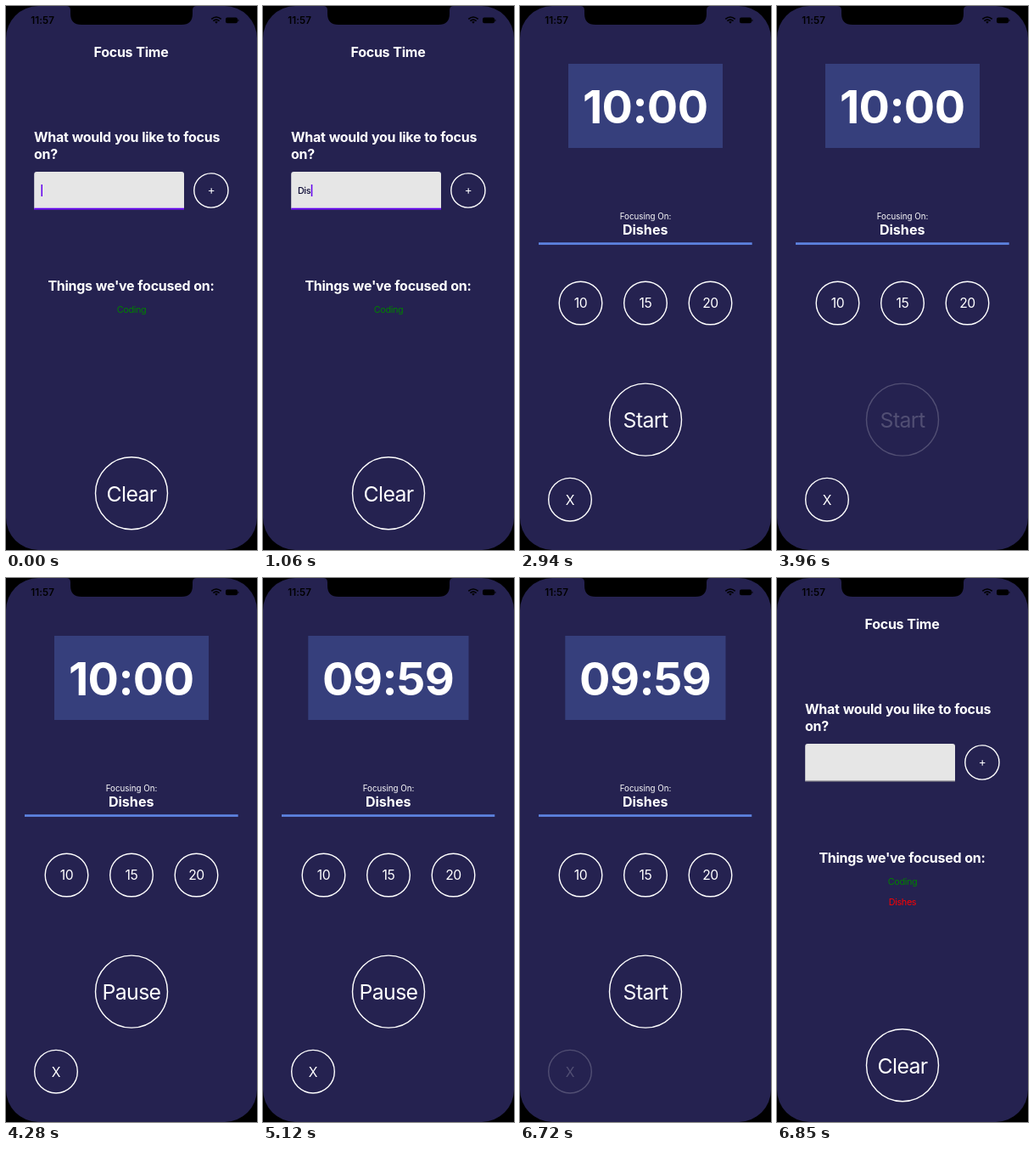
Recreate the animation shown at these times as an HTML page. Size 296 by 640 pixels, loop 6.87 s.

```html
<!DOCTYPE html>
<html lang="en">
<head>
<meta charset="utf-8">
<title>Focus timer</title>
<style>
  html, body { margin: 0; width: 100%; height: 100%; overflow: hidden; background: #000; }
  svg { display: block; width: 296px; height: 640px; }
  text { font-family: Inter, "Liberation Sans", sans-serif; fill: #fff; }
  .mid { text-anchor: middle; }
  .title { font-size: 16px; font-weight: 700; letter-spacing: -0.27px; word-spacing: 0.5px; }
  .small { font-size: 10.8px; letter-spacing: -0.35px; }
  .clock { font-size: 54px; font-weight: 700; letter-spacing: -0.6px; }
  .status { font-size: 11.6px; font-weight: 600; letter-spacing: 0.1px; fill: #000; }
  .button text { letter-spacing: -0.025em; font-feature-settings: "case"; }
  .button circle { fill: none; stroke: #fff; stroke-width: 1.4; }
</style>
</head>
<body>
<svg viewBox="0 0 296 640">
  <rect width="296" height="640"/>
  <rect width="296" height="640" rx="38" fill="#252250"/>
  <path d="M71 0Q76 0 76 5V9Q76 22 89 22H207Q220 22 220 9V5Q220 0 225 0Z"/>

  <text class="status" x="29.3" y="21">11:57</text>
  <g fill="none" stroke="#000" stroke-width="1.6">
    <path d="M242.3 15.4Q248 10.6 253.7 15.4"/>
    <path d="M244.4 17.6Q248 14.6 251.6 17.6"/>
  </g>
  <path d="M246.2 18.8Q248 17.3 249.8 18.8L248 20.7Z"/>
  <rect x="259" y="13.5" width="14" height="6.8" rx="2"/>
  <rect x="273.4" y="15.6" width="1" height="2.6" rx=".5"/>

  <g id="home">
    <text class="title mid" x="147.5" y="60">Focus Time</text>
    <text class="title" x="33" y="160">What would you like to focus</text>
    <text class="title" x="33" y="180">on?</text>
    <path d="M33.2 239.3V198Q33.2 195 36.2 195H207Q210 195 210 198V239.3Z" fill="#e6e6e6"/>
    <rect id="line" x="33.2" width="176.8"/>
    <text id="entry" class="small" x="40.9" y="221" font-weight="500" style="fill:#0c0a35"></text>
    <rect id="caret" y="210" width="1.5" height="14" fill="#6200ee"/>
    <text class="title mid" x="147.5" y="335">Things we've focused on:</text>
    <text class="small mid" x="148" y="361" style="fill:#008000">Coding</text>
    <text id="done" class="small mid" x="148" y="385" style="fill:#f00">Dishes</text>
  </g>

  <g id="timer">
    <rect id="panel" y="68" height="99" fill="#363f7c"/>
    <text id="clock" class="clock mid" x="147.7" y="137.5"></text>
    <text class="mid" x="148" y="250.5" font-size="9.75">Focusing On:</text>
    <text class="mid" x="147.7" y="269" font-size="16.1" font-weight="700">Dishes</text>
    <rect id="bar" x="22" y="278.2" height="2.7" fill="#5e84e2"/>
  </g>
</svg>

<script>
const LOOP = 6870;
const $ = id => document.getElementById(id);

// Each step is [time, changed properties]; the rest carries over.
const steps = [
  [0, { screen: 'home', entry: '', focused: true, done: false, add: 1,
        clock: '10:00', main: 'Start', press: 1, close: 1 }],
  [510, { entry: 'D' }],
  [820, { entry: 'Di' }],
  [940, { entry: 'Dis' }],
  [1210, { entry: 'Dishe' }],
  [1360, { entry: 'Dishes' }],
  [1880, { focused: false }],
  [2800, { add: 0.2 }],
  [2940, { screen: 'timer', add: 1 }],
  [3960, { press: 0.2 }],
  [4080, { main: 'Pause', press: 0.35 }],
  [4180, { press: 0.75 }],
  [4280, { press: 1 }],
  [5120, { clock: '09:59' }],
  [5910, { press: 0.2 }],
  [6030, { main: 'Start', press: 0.35 }],
  [6140, { press: 0.75 }],
  [6240, { press: 1 }],
  [6720, { close: 0.2 }],
  [6850, { screen: 'home', entry: '', done: true }]
];

function make(tag, attrs, parent) {
  const el = document.createElementNS('http://www.w3.org/2000/svg', tag);
  for (const name in attrs) el.setAttribute(name, attrs[name]);
  return parent.appendChild(el);
}

function button(screen, x, y, r, size, label) {
  const group = make('g', { class: 'button' }, $(screen));
  make('circle', { cx: x, cy: y, r }, group);
  const text = make('text', { class: 'mid', x, y: y + size * 0.38, 'font-size': size }, group);
  text.textContent = label;
  return { group, text };
}

const add = button('home', 241.9, 217, 20.1, 13.4, '+');
button('home', 148, 573.3, 42.5, 24.8, 'Clear');
['10', '15', '20'].forEach((n, i) => button('timer', 71.5 + i * 76.5, 349.5, 25.3, 15.7, n));
const main = button('timer', 148, 486.6, 42.5, 24.8, 'Start');
const close = button('timer', 59, 580.7, 25.3, 15.7, 'X');

function setAttrs(id, attrs) {
  for (const name in attrs) $(id).setAttribute(name, attrs[name]);
}

function show(id, visible) {
  $(id).style.display = visible ? '' : 'none';
}

function draw(s) {
  show('home', s.screen === 'home');
  show('timer', s.screen === 'timer');
  show('done', s.done);
  show('caret', s.focused && !s.done);

  $('entry').textContent = s.entry;
  const typed = s.entry && s.screen === 'home' ? $('entry').getComputedTextLength() : 0;
  setAttrs('caret', { x: 41.5 + typed });
  setAttrs('line', s.focused
    ? { y: 237.7, height: 1.9, fill: '#6200ee' }
    : { y: 238.5, height: 0.9, fill: '#66656f' });

  const full = s.clock === '10:00';
  $('clock').textContent = s.clock;
  setAttrs('panel', full ? { x: 57, width: 182 } : { x: 53.3, width: 189.2 });
  setAttrs('bar', { width: 251.7 * (full ? 1 : 599 / 600) });

  main.text.textContent = s.main;
  main.group.style.opacity = s.press;
  add.group.style.opacity = s.add;
  close.group.style.opacity = s.close;
}

const start = performance.now();
let shown = -1;

function tick() {
  const t = (performance.now() - start) % LOOP;
  const past = steps.filter(([at]) => at <= t);
  if (past.length !== shown) {
    shown = past.length;
    draw(Object.assign({}, ...past.map(([, change]) => change)));
  }
  requestAnimationFrame(tick);
}
tick();
</script>
</body>
</html>
```
